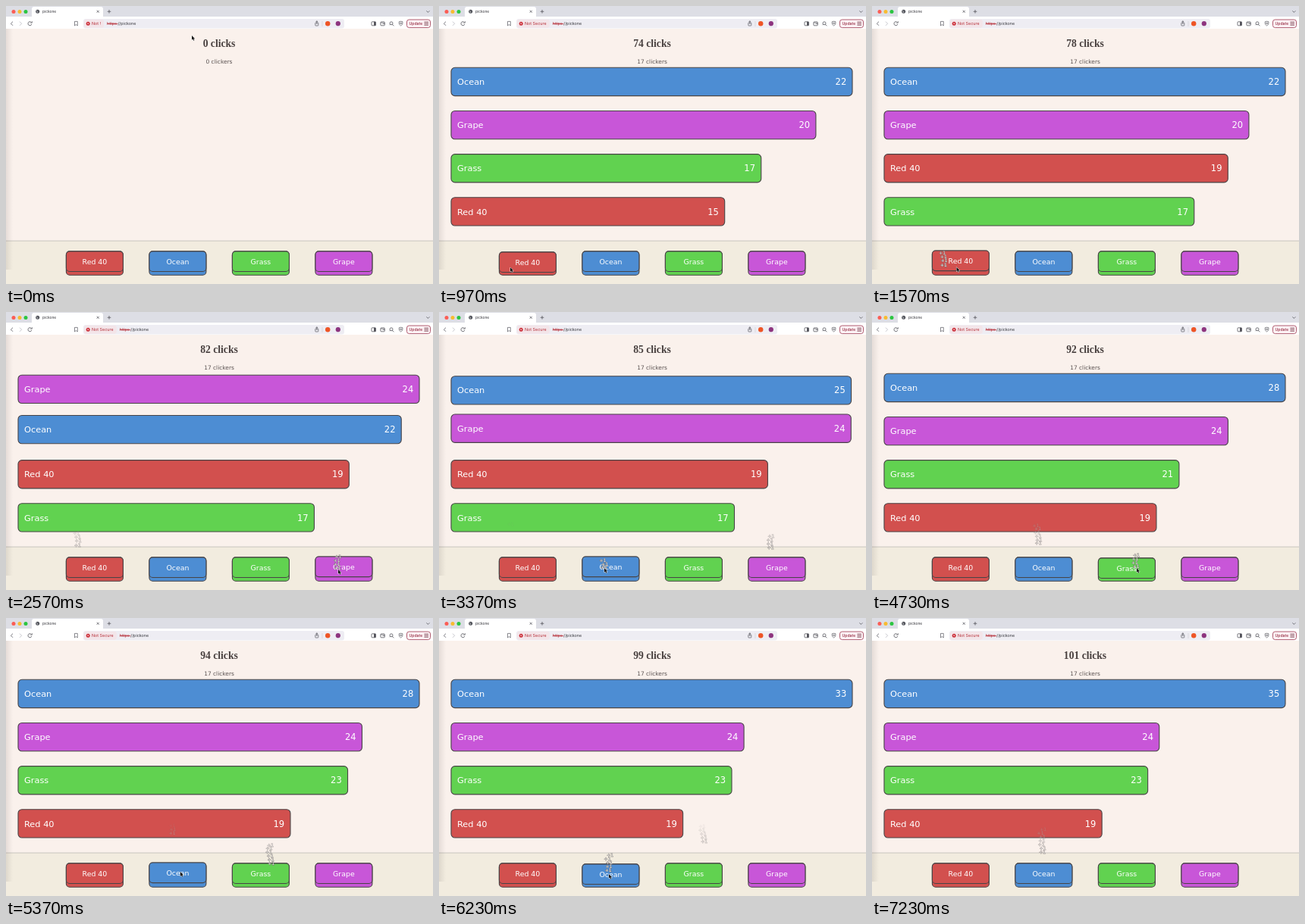
An HTML page with a canvas that plays this animation: 563x367 px, repeating every 7260 ms.

```html
<!DOCTYPE html>
<html lang="en">
<head>
<meta charset="utf-8">
<title>pickone</title>
<style>
html, body { margin: 0; width: 100%; height: 100%; overflow: hidden; background: #faf1ec; }
canvas { display: block; width: 563px; height: 367px; }
</style>
</head>
<body>
<canvas id="stage"></canvas>
<script>
const W = 563, H = 367, LOOP = 7260, LOAD = 130;
const canvas = document.getElementById('stage');
const g = canvas.getContext('2d');
const dpr = window.devicePixelRatio || 1;
canvas.width = W * dpr;
canvas.height = H * dpr;

const SANS = '"DejaVu Sans", sans-serif';
const UI = 'Inter, Roboto, sans-serif';
const SERIF = '"Liberation Serif", serif';
const INK = '#484446';

const picks = [
  { name: 'Red 40', color: '#d2504e', start: 15 },
  { name: 'Ocean', color: '#4d8dd3', start: 22 },
  { name: 'Grass', color: '#61d250', start: 17 },
  { name: 'Grape', color: '#c856d8', start: 20 }
];

// pick index, pointer x and y, first click, gap, number of clicks
const bursts = [
  [0, 94, 346, 990, 150, 4],
  [3, 438, 339, 2095, 150, 4],
  [1, 218, 338, 3070, 140, 6],
  [2, 348, 339, 4210, 146, 6],
  [1, 224, 338, 5500, 147, 7]
];
const clicks = bursts.flatMap(([pick, x, y, first, gap, n]) =>
  Array.from({ length: n }, (_, i) => ({ pick, x, y, time: first + i * gap })));

const path = [
  [0, 245, 39], [80, 245, 39], [800, 94, 345], [1500, 94, 345],
  [2020, 438, 340], [2600, 438, 340], [3000, 218, 338], [3800, 218, 338],
  [4110, 349, 338], [4980, 349, 338], [5360, 230, 335], [5470, 224, 338],
  [6430, 224, 338], [6800, 236, 380]
];

const clamp = v => Math.max(0, Math.min(1, v));
const mix = (a, b, p) => a + (b - a) * p;
const smooth = p => p * p * (3 - 2 * p);
const noise = n => { const v = Math.sin(n * 127.1 + 3.7) * 43758.5; return v - Math.floor(v); };

// cubic-bezier(.25, .1, .25, 1)
function ease(p) {
  if (p <= 0 || p >= 1) return clamp(p);
  let lo = 0, hi = 1, u = 0.5;
  for (let i = 0; i < 16; i++) {
    u = (lo + hi) / 2;
    const x = 0.75 * u * (1 - u) + u * u * u;
    if (x < p) lo = u; else hi = u;
  }
  return 0.3 * u * (1 - u) * (1 - u) + 3 * u * u * (1 - u) + u * u * u;
}

function text(str, x, y, size, color, font = SANS, align = 'left', weight = '') {
  g.font = `${weight} ${size}px ${font}`;
  g.textAlign = align;
  g.textBaseline = 'alphabetic';
  g.fillStyle = color;
  g.fillText(str, x, y);
}

function box(x, y, w, h, r, fill, stroke, lw = 1) {
  g.beginPath();
  g.roundRect(x, y, w, h, r);
  if (fill) { g.fillStyle = fill; g.fill(); }
  if (stroke) { g.strokeStyle = stroke; g.lineWidth = lw; g.stroke(); }
}

function dot(x, y, r, fill) {
  g.beginPath();
  g.arc(x, y, r, 0, Math.PI * 2);
  g.fillStyle = fill;
  g.fill();
}

function line(points, color, lw = 0.8) {
  g.beginPath();
  for (let i = 0; i < points.length; i += 2) g.lineTo(points[i], points[i + 1]);
  g.strokeStyle = color;
  g.lineWidth = lw;
  g.stroke();
}

function ring(x, y, r, color, from = 0, to = Math.PI * 2) {
  g.beginPath();
  g.arc(x, y, r, from, to);
  g.strokeStyle = color;
  g.lineWidth = 0.8;
  g.stroke();
}

function targets(counts) {
  const max = Math.max(...counts);
  const order = [0, 1, 2, 3].sort((a, b) => counts[b] - counts[a]);
  return counts.map((c, i) => [529 * c / max, 81.3 + 57.15 * order.indexOf(i)]);
}

// Every change of width or place restarts that property's transition.
function layout(t) {
  const counts = picks.map(p => p.start);
  const props = targets(counts).map(pair => pair.map(v => ({ from: v, to: v, at: -999 })));
  const value = (q, now) => mix(q.from, q.to, ease((now - q.at) / 230));
  for (const c of clicks) {
    if (c.time > t) break;
    counts[c.pick]++;
    targets(counts).forEach((pair, i) => pair.forEach((v, k) => {
      const q = props[i][k];
      if (Math.abs(v - q.to) > 0.01) props[i][k] = { from: value(q, c.time), to: v, at: c.time };
    }));
  }
  return { counts, bars: props.map(([w, y]) => ({ w: value(w, t), y: value(y, t) })) };
}

function pointer(t) {
  for (let i = 1; i < path.length; i++) {
    const a = path[i - 1], b = path[i];
    if (t <= b[0]) {
      const p = smooth((t - a[0]) / (b[0] - a[0]));
      return [mix(a[1], b[1], p), mix(a[2], b[2], p)];
    }
  }
  return [-50, -50];
}

function drawBrowser(t) {
  const icon = '#55555c', red = '#b52b35';
  g.fillStyle = '#dddee5';
  g.fillRect(0, 0, W, 15);
  ['#fb5d55', '#f8bb30', '#2bc541'].forEach((c, i) => dot(10 + i * 8, 7.4, 2.5, c));
  box(34, 1, 94, 16, 3, '#fff');
  g.fillStyle = '#fff';
  g.fillRect(0, 14, W, 16);
  dot(41.7, 7.2, 2.5, '#55575e');
  line([40, 6.4, 41.6, 7.3, 41.2, 9], '#ddd', 0.6);
  text('pickone', 48, 9, 4.9, '#34343a', UI);
  line([119.7, 5.8, 122.7, 8.8], icon);
  line([122.7, 5.8, 119.7, 8.8], icon);
  line([133.7, 7.3, 138.3, 7.3], icon);
  line([136, 5, 136, 9.6], icon);
  line([554.4, 6.4, 556.4, 8.4, 558.4, 6.4], icon);

  line([9, 20.6, 6.4, 23.2, 9, 25.8], icon);
  line([18, 20.6, 20.6, 23.2, 18, 25.8], '#b8b8be');
  ring(31.5, 23.2, 2.5, icon, 0.3, 5.5);
  line([34.3, 20.2, 34.3, 22.2, 32.2, 22.2], icon);
  line([90.5, 20.4, 94.3, 20.4, 94.3, 26, 92.4, 24.5, 90.5, 26, 90.5, 20.4], icon, 0.7);

  box(102, 17, 344, 12.5, 3, '#eeedf3');
  const open = smooth(clamp(t / 240));
  const urlX = mix(133, 149.8, open);
  box(103, 17.7, urlX - 107, 11, 3, '#f3e5e9');
  dot(108.2, 23.2, 2.5, '#cb2d38');
  line([107.3, 22.3, 109.1, 24.1], '#fff', 0.6);
  line([109.1, 22.3, 107.3, 24.1], '#fff', 0.6);
  if (open < 0.05) {
    text('Not !', 113, 25.2, 5.4, red, UI);
  } else {
    g.save();
    g.beginPath();
    g.rect(112, 17, urlX - 118.5, 13);
    g.clip();
    text('Not Secure', 113, 25.2, 5.4, red, UI);
    g.restore();
  }
  text('https:', urlX, 25.2, 5.4, red, UI);
  const w = g.measureText('https:').width;
  line([urlX, 23.5, urlX + w, 23.5], red, 0.7);
  text('//pickone', urlX + w, 25.2, 5.4, '#36363c', UI);

  box(407.8, 22, 4, 4, 0.6, null, icon, 0.7);
  line([409.8, 24, 409.8, 19.8], icon, 0.7);
  line([408.5, 21, 409.8, 19.7, 411.1, 21], icon, 0.7);
  line([417, 20, 417, 27], '#d0d0d6', 0.7);
  dot(424.2, 23.2, 3.2, '#ee5526');
  dot(437.8, 23.2, 3.1, '#8d347f');

  box(482, 20.8, 5.5, 5, 0.8, null, icon, 0.8);
  g.fillStyle = icon;
  g.fillRect(485, 20.8, 2.5, 5);
  box(493.9, 21, 5.4, 4.8, 0.8, null, icon, 0.8);
  line([496.6, 23.4, 499.3, 23.4], icon);
  line([494, 22, 499, 22], icon, 0.6);
  ring(508, 22.8, 2, icon);
  line([509.2, 24.2, 511.3, 26.3], icon);
  line([505.6, 25.2, 506.6, 24.2], icon);
  line([518.2, 20.8, 520.6, 20.2, 523, 20.8, 522.7, 24.2, 520.6, 26, 518.5, 24.2, 518.2, 20.8], icon, 0.7);
  ring(520.6, 22.8, 0.8, icon);
  box(528.5, 18, 31, 10.6, 3, '#fdf2f5', '#a84b61', 0.9);
  text('Update', 531.5, 25.2, 5.1, '#93283f', UI, 'left', '500');
  for (let i = 0; i < 3; i++) line([551.4, 21.2 + i * 2, 557, 21.2 + i * 2], '#6d3041', 0.8);
}

function drawPage() {
  g.fillStyle = '#faf1ec';
  g.fillRect(0, 30, W, 280);
  g.fillStyle = '#f2ecdf';
  g.fillRect(0, 310, W, H - 310);
  g.fillStyle = '#c3c0ba';
  g.fillRect(0, 309.6, W, 0.9);
  const shade = g.createLinearGradient(0, 0, 9, 0);
  shade.addColorStop(0, 'rgba(90,80,80,.13)');
  shade.addColorStop(1, 'rgba(90,80,80,0)');
  g.fillStyle = shade;
  g.fillRect(0, 30, 9, 318);
}

function drawBars({ counts, bars }) {
  const order = [0, 1, 2, 3].sort((a, b) => counts[a] - counts[b]);
  for (const i of order) {
    const { w, y } = bars[i];
    box(16, y, w, 37.3, 5, picks[i].color, INK, 1.1);
    text(picks[i].name, 24, y + 22.8, 11.35, '#fff');
    text(counts[i], 16 + w - 7.8, y + 22.8, 11.5, '#fff', SANS, 'right');
  }
}

function drawButtons(t, [px, py]) {
  picks.forEach((p, i) => {
    const x = 79.4 + i * 109.5;
    const hover = px > x && px < x + 75 && py > 323 && py < 355;
    const down = clicks.some(c => c.pick === i && t >= c.time - 70 && t < c.time);
    const y = 323.9 + (down ? 1 : hover ? -0.9 : 0);
    box(x, y, 75, 355.2 - y, 4.5, p.color, INK, 1.1);
    box(x, y, 75, 26.6, 4.5, p.color, INK, 1.1);
    text(p.name, x + 37.5, y + 17.4, 9.4, '#fff', SANS, 'center');
  });
}

function drawPops(t) {
  g.font = `6px ${SANS}`;
  g.textAlign = 'center';
  g.lineWidth = 1;
  g.lineJoin = 'round';
  clicks.forEach((c, i) => {
    const age = t - c.time;
    if (age < 0 || age > 2000) return;
    const x = c.x + (noise(i) - 0.5) * 4;
    const y = c.y + 2 - age * 0.034;
    g.globalAlpha = 1 - age / 2000;
    g.strokeStyle = '#77716f';
    g.strokeText('+1', x, y);
    g.fillStyle = '#fff';
    g.fillText('+1', x, y);
  });
  g.globalAlpha = 1;
}

function drawPointer([x, y]) {
  const shape = [0, 0, 0, 5.8, 1.3, 4.6, 2.3, 6.7, 3.3, 6.2, 2.4, 4.3, 4.1, 4.2];
  g.beginPath();
  for (let i = 0; i < shape.length; i += 2) g.lineTo(x + shape[i], y + shape[i + 1]);
  g.closePath();
  g.strokeStyle = 'rgba(255,255,255,.8)';
  g.lineWidth = 1;
  g.stroke();
  g.fillStyle = '#161616';
  g.fill();
}

function draw(t) {
  g.setTransform(dpr, 0, 0, dpr, 0, 0);
  const loaded = t >= LOAD;
  const state = layout(t);
  const total = loaded ? state.counts.reduce((a, b) => a + b) : 0;
  const at = pointer(t);
  drawPage();
  drawBrowser(t);
  text(`${total} clicks`, W / 2 - 0.5, 54, 13.6, '#48403f', SERIF, 'center', 'bold');
  text(`${loaded ? 17 : 0} clickers`, W / 2 - 0.5, 75.7, 7.45, '#5a5251', SANS, 'center');
  if (loaded) drawBars(state);
  drawButtons(t, at);
  drawPops(t);
  drawPointer(at);
}

const begin = performance.now();
function frame() {
  draw((performance.now() - begin) % LOOP);
  requestAnimationFrame(frame);
}
frame();
</script>
</body>
</html>
```
